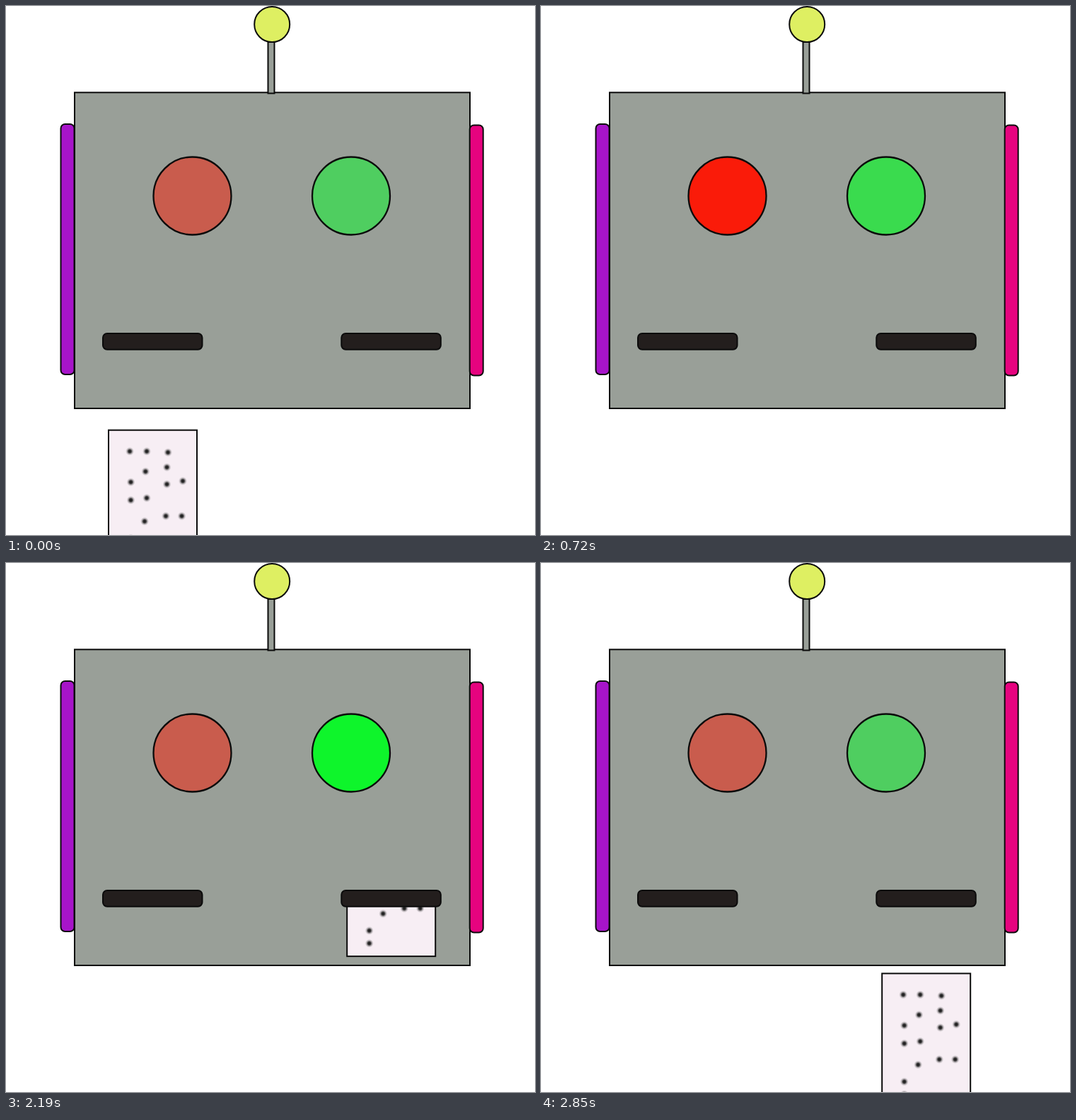
Write an HTML page that moves like this. It is 748 by 748 pixels and loops after 2880 ms.

```html
<!DOCTYPE html>
<html lang="en">
<head>
<meta charset="utf-8">
<title>Robot</title>
<style>
  html, body { margin: 0; width: 100%; height: 100%; overflow: hidden; background: #fff; }
  svg { display: block; width: 100vw; height: 100vh; }
</style>
</head>
<body>
<svg viewBox="0 0 748 748" stroke="#0b0b0b" stroke-width="2">
  <defs>
    <radialGradient id="ink">
      <stop offset="0" stop-color="#111"/>
      <stop offset=".35" stop-color="#222" stop-opacity=".9"/>
      <stop offset=".7" stop-color="#444" stop-opacity=".3"/>
      <stop offset="1" stop-color="#555" stop-opacity="0"/>
    </radialGradient>
    <clipPath id="below"><rect y="474" width="748" height="274"/></clipPath>
    <g id="card">
      <rect width="125" height="189.3" fill="#f7eef4"/>
      <g id="dots" fill="url(#ink)" stroke="none"></g>
    </g>
  </defs>

  <rect x="97" y="122.3" width="559" height="446.7" fill="#999f98"/>
  <rect x="370.5" y="51" width="9" height="72.5" fill="#999f98"/>
  <circle cx="376.2" cy="26" r="25" fill="#deef62"/>
  <rect x="77.5" y="167" width="19" height="354" rx="6" fill="#a714c9"/>
  <rect x="655.7" y="168.5" width="19" height="354" rx="6" fill="#e6037f"/>
  <circle id="red" cx="263.5" cy="268.5" r="55" stroke-width="2.3"/>
  <circle id="green" cx="488" cy="268.5" r="55" stroke-width="2.3"/>

  <g clip-path="url(#below)">
    <use id="left" href="#card"/>
    <use id="right" href="#card"/>
  </g>
  <g fill="#231e1d">
    <rect x="137" y="463" width="140.5" height="22.7" rx="6"/>
    <rect x="474.3" y="463" width="140.5" height="22.7" rx="6"/>
  </g>
</svg>
<script>
const LOOP = 2880, STEP = 30;
const $ = id => document.getElementById(id);

// Ink spots, relative to the card's top left corner
const spots = [
  [30, 30], [54, 30], [84, 31.5], [82.5, 52.5], [52.3, 58.5],
  [31.5, 73.5], [82.5, 76.5], [105, 72], [31.5, 99], [54, 96],
  [81, 121.5], [103.5, 121.5], [51, 129], [31.5, 153], [31.5, 171]
];
$('dots').innerHTML = spots.map(([x, y]) => `<circle cx="${x}" cy="${y}" r="6"/>`).join('');

const mix = (a, b, k) => `rgb(${a.map((v, i) => Math.round(v + (b[i] - v) * k))})`;
// Rises to 1 at peak, falls back to 0 at end
const pulse = (t, peak, end) =>
  t < peak ? t / peak : Math.max(0, (end - t) / (end - peak));
const place = (id, x, y) => $(id).setAttribute('transform', `translate(${x} ${y})`);

function draw(t) {
  $('red').setAttribute('fill', mix([201, 92, 77], [255, 20, 2], pulse(t, 795, 1590)));
  $('green').setAttribute('fill', mix([79, 206, 96], [0, 253, 31], pulse(t, 2670, 2850)));
  place('left', 145, 599.7 - t * 190 / 450);
  place('right', 482.2, 444.5 + (t - 2430) * 0.3236);
}

function tick() {
  const t = performance.now() % LOOP;
  draw(Math.floor(t / STEP) * STEP);
  requestAnimationFrame(tick);
}
tick();
</script>
</body>
</html>
```
